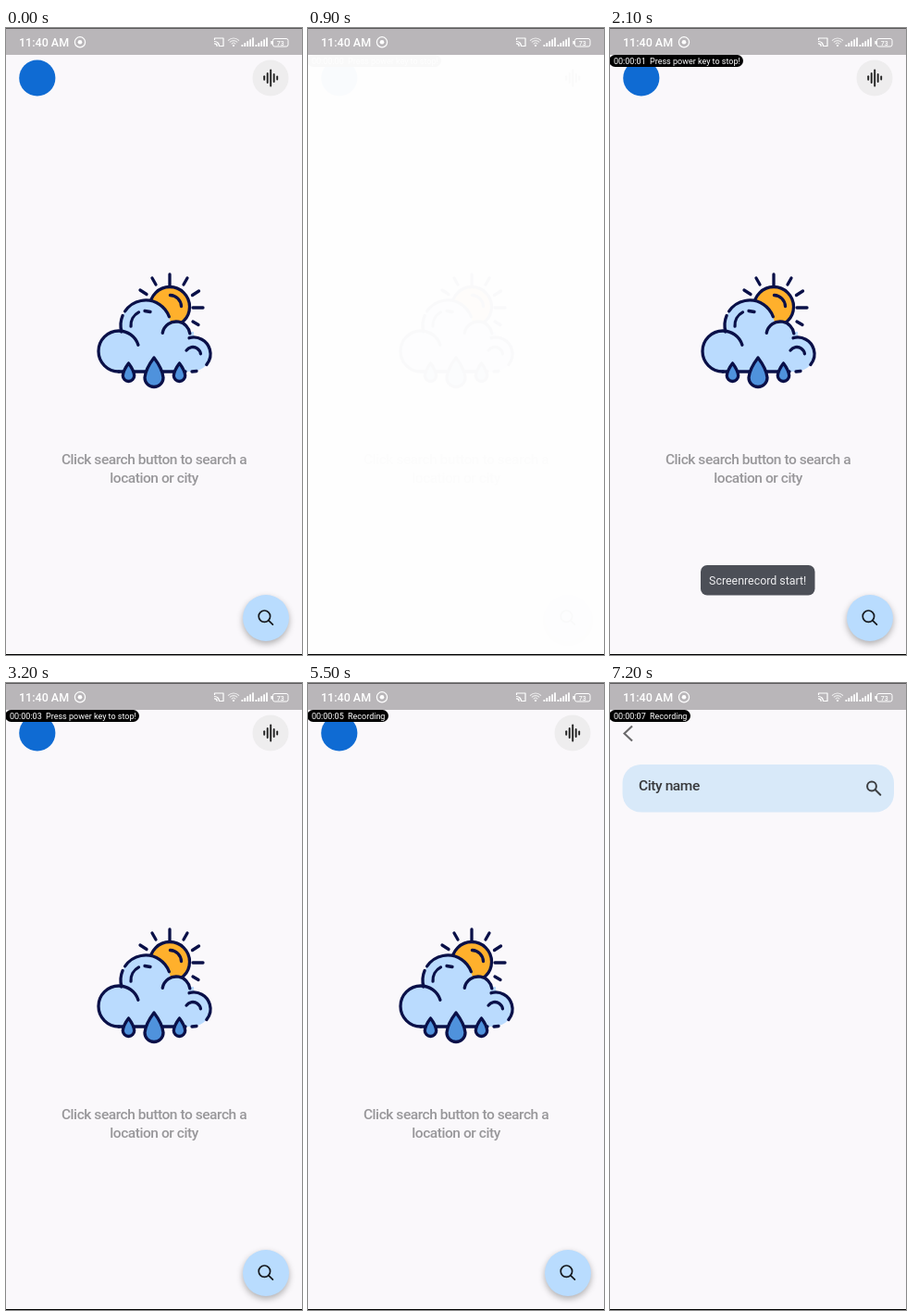
These frames come from a looping animation (320x677 px, 8000 ms). An HTML page with a canvas:

```html
<!DOCTYPE html>
<html lang="en">
<head>
<meta charset="utf-8">
<title>Weather app recording</title>
<style>
  html, body { margin: 0; width: 100%; height: 100%; overflow: hidden; background: #faf8fb; }
  canvas { display: block; width: 100vw; height: 100vh; }
</style>
</head>
<body>
<canvas id="stage"></canvas>
<script>
const W = 320, H = 677, LOOP = 8000, STEP = 100;
const NAVY = '#0a1048', SKY = '#badbfe', PAPER = '#faf8fb';
const canvas = document.getElementById('stage');
const ctx = canvas.getContext('2d');
const dpr = window.devicePixelRatio || 1;
canvas.width = W * dpr;
canvas.height = H * dpr;

const clamp = v => Math.max(0, Math.min(1, v));
const ramp = (t, from, to) => clamp((t - from) / (to - from));
const rad = deg => deg * Math.PI / 180;

function rect(x, y, w, h, color) {
  ctx.fillStyle = color;
  ctx.fillRect(x, y, w, h);
}

function round(x, y, w, h, r, color) {
  ctx.beginPath();
  ctx.roundRect(x, y, w, h, r);
  ctx.fillStyle = color;
  ctx.fill();
}

function disc(x, y, r, color) {
  ctx.beginPath();
  ctx.arc(x, y, r, 0, 7);
  ctx.fillStyle = color;
  ctx.fill();
}

function pen(color, width, cap = 'round') {
  ctx.strokeStyle = color;
  ctx.lineWidth = width;
  ctx.lineCap = cap;
  ctx.lineJoin = cap === 'round' ? 'round' : 'miter';
}

function line(...p) {
  ctx.beginPath();
  for (let i = 0; i < p.length; i += 2) ctx.lineTo(p[i], p[i + 1]);
  ctx.stroke();
}

// Clockwise arc, angles in degrees.
function arc(x, y, r, from = 0, to = 360) {
  ctx.beginPath();
  ctx.arc(x, y, r, rad(from), rad(to));
  ctx.stroke();
}

function text(str, x, y, size, color, { weight = 400, align = 'left', spacing = 0 } = {}) {
  ctx.font = `${weight} ${size}px Roboto, sans-serif`;
  ctx.letterSpacing = spacing + 'px';
  ctx.textAlign = align;
  ctx.fillStyle = color;
  ctx.fillText(str, x, y);
}

function signal(x) {
  for (let i = 0; i < 5; i++) {
    const h = 2 + i * 1.9;
    rect(x + i * 2.9, 20 - h, 1.8, h, '#fff');
  }
}

function statusBar(recording) {
  rect(0, 0, W, 29, '#b9b6b9');
  text('11:40 AM', 14, 20, 12.5, '#fff', { weight: 500 });
  pen('#fff', 1.2);
  if (recording) {
    arc(80, 15.3, 5.6);
    disc(80, 15.3, 2.3, '#fff');
    line(225.5, 12.5, 225.5, 11, 235, 11, 235, 19.5, 231.5, 19.5);
    arc(225.5, 19.5, 2.6, 270, 360);
    arc(225.5, 19.5, 5, 270, 360);
  }
  pen('rgba(255,255,255,.75)', 1.1);
  for (const r of [2.8, 5.4, 8]) arc(246, 19, r, 225, 315);
  disc(246, 19, 1.1, '#fff');
  signal(254.5);
  signal(269.5);
  pen('#fff', 1);
  ctx.beginPath();
  ctx.roundRect(288.5, 11.5, 16.5, 8.5, 2);
  ctx.stroke();
  rect(286.3, 14, 1.6, 3.5, '#fff');
  text('73', 296.8, 18.6, 7, '#fff', { weight: 500, align: 'center' });
}

function drop(x, top, bottom, r) {
  const cy = bottom - r;
  ctx.beginPath();
  ctx.moveTo(x, top);
  ctx.quadraticCurveTo(x + r * 0.9, top + (cy - top) * 0.55, x + r, cy);
  ctx.arc(x, cy, r, 0, Math.PI);
  ctx.quadraticCurveTo(x - r * 0.9, top + (cy - top) * 0.55, x, top);
  ctx.fillStyle = '#4f92dc';
  ctx.fill();
  ctx.stroke();
}

function weather() {
  pen(NAVY, 3.3);
  line(177, 266, 177, 278);
  line(158, 270, 162, 277);
  line(145, 283, 152, 287.5);
  line(196, 270, 192, 277);
  line(208.5, 284, 201.5, 288.5);
  line(202, 302, 213, 302);
  line(202, 317, 208, 320.5);

  disc(177, 301, 21.5, '#ffb02c');
  arc(177, 301, 21.5);
  arc(177, 301, 12.5, 272, 358);

  disc(151, 321, 27, SKY);
  disc(122, 349, 22, SKY);
  disc(184, 332, 15, SKY);
  disc(203, 352, 18, SKY);
  rect(122, 328, 81, 43, SKY);

  arc(122, 349, 22, 90, 342);
  arc(151, 321, 27, 165, 203);
  arc(151, 321, 27, 214, 340);
  arc(184, 332, 15, 190, 352);
  arc(203, 352, 18, 254, 400);
  line(122, 371, 194, 371);
  line(201, 371, 206, 370.5);
  arc(151, 321, 16, 176, 242);
  line(150, 305.5, 156, 306.5);
  arc(202, 353, 8.5, 215, 352);

  drop(132.5, 362, 381.5, 6.2);
  drop(187.5, 362, 381.5, 6.2);
  drop(160, 356, 387.5, 10);
}

function magnifier(x, y, r, tip, color, width) {
  pen(color, width);
  arc(x, y, r);
  line(x + r * 0.71, y + r * 0.71, x + tip, y + tip);
}

function home() {
  rect(0, 0, W, H, PAPER);
  disc(33.8, 54, 19.6, '#0f6bd3');
  disc(286, 54, 19.5, '#eeedee');
  pen('#222', 1.9);
  [1.7, 5, 8.5, 4, 1.5].forEach((h, i) => {
    const x = 279.2 + i * 3.5;
    line(x, 54 - h, x, 54 + h);
  });

  weather();
  const hint = { weight: 500, align: 'center', spacing: -0.45 };
  text('Click search button to search a', 160, 470.5, 15.5, '#98979a', hint);
  text('location or city', 160, 491, 15.5, '#98979a', hint);

  ctx.save();
  ctx.shadowColor = 'rgba(0,0,0,.3)';
  ctx.shadowBlur = 7 * dpr;
  ctx.shadowOffsetY = 3 * dpr;
  disc(281, 637, 25, '#b9dcfe');
  ctx.restore();
  magnifier(279.4, 635.2, 6.2, 9, '#15181d', 1.7);
}

function search() {
  rect(0, 0, W, H, PAPER);
  pen('#6a696b', 2.1, 'butt');
  line(24, 46.5, 15.5, 54.5, 24, 62.5);
  round(13.5, 88, 293.5, 51.5, 20, '#d8e9f9');
  text('City name', 31, 116, 15.5, '#38393c', { weight: 500, spacing: -0.4 });
  magnifier(283, 111.5, 4.9, 9.3, '#3c3e41', 2);
}

function pill(t) {
  const seconds = Math.floor((t - 200) / 1000);
  const early = t < 5200;
  round(-1, 29, early ? 145 : 88, 13, 6.5, '#000');
  text('00:00:0' + seconds, 4, 39, 9, '#fff');
  text(early ? 'Press power key to stop!' : 'Recording', 43, 39, 9, '#fff');
}

function toast(t) {
  ctx.save();
  ctx.globalAlpha = ramp(t, 900, 1300) * (1 - ramp(t, 2100, 2500));
  round(98, 580, 123.5, 32.5, 7, '#4c4f57');
  text('Screenrecord start!', 159.7, 601, 12.4, '#eeeef0', { align: 'center' });
  ctx.restore();
}

function capture(t) {
  const k = ramp(t, 0, 600);
  const s = 1 - 0.081 * k;
  const x = 13 * k, y = 40 * k;
  rect(0, 0, W, H, '#000');
  rect(x - 9, y - 9, W * s + 18, H * s + 16, '#fff');
  ctx.save();
  ctx.translate(x, y);
  ctx.scale(s, s);
  ctx.beginPath();
  ctx.rect(0, 0, W, H);
  ctx.clip();
  home();
  statusBar(false);
  ctx.restore();
}

function flash(t) {
  const a = t <= 900 ? 0.98 * ramp(t, 600, 900) : 0.98 * (1 - ramp(t, 900, 1300));
  if (a > 0) rect(0, 29, W, H - 29, `rgba(254,254,254,${a})`);
}

function draw(t) {
  ctx.setTransform(canvas.width / W, 0, 0, canvas.height / H, 0, 0);
  if (t >= 100 && t < 900) capture(t);
  else if (t < 6000) home();
  else search();
  if (t >= 900) {
    pill(Math.max(t, 200));
    toast(t);
  }
  flash(t);
  statusBar(true);
  rect(0, 0, W, 0.8, '#444');
  rect(0, H - 1, W, 1, '#000');
}

const start = performance.now();
function tick() {
  const t = (performance.now() - start) % LOOP;
  draw(Math.floor(t / STEP) * STEP);
  requestAnimationFrame(tick);
}
tick();
</script>
</body>
</html>
```
